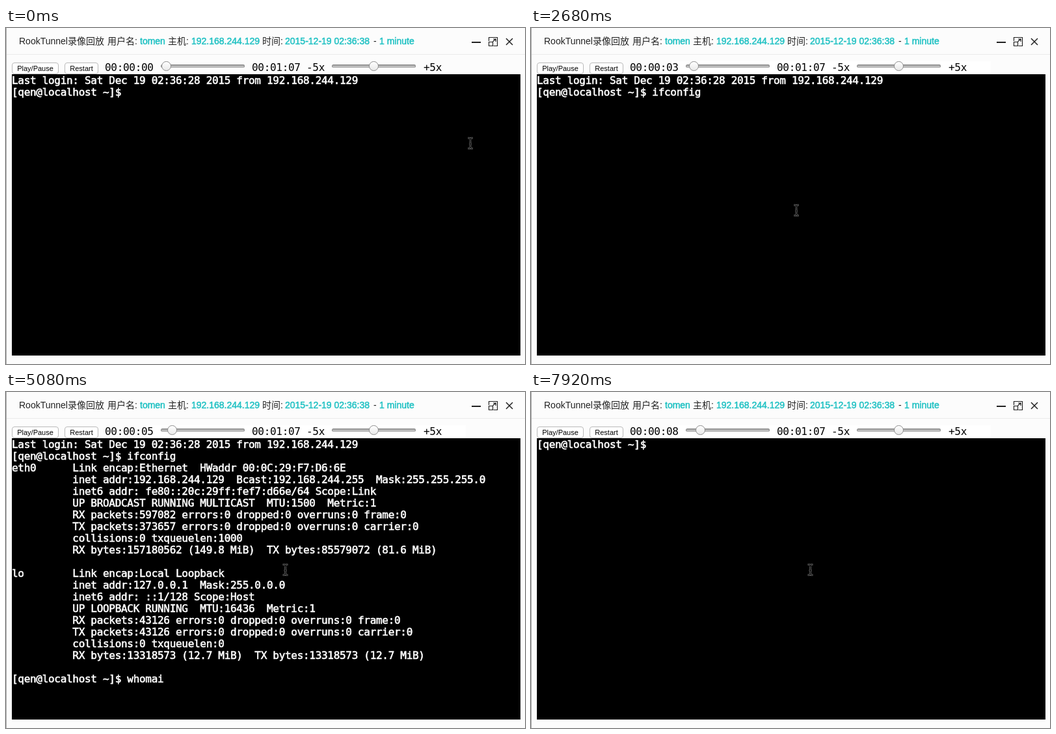
Recreate the animation shown at these times as an HTML page. Size 798 px wide and 516 px high, loop 8 s.

```html
<!DOCTYPE html>
<html lang="zh">
<head>
<meta charset="utf-8">
<title>Session replay</title>
<style>
html, body { margin: 0; width: 100%; height: 100%; overflow: hidden; }
body { position: relative; background: #fcfcfc; color: #000; }
body * { position: absolute; box-sizing: border-box; margin: 0; white-space: pre; }
.edge { left: 0; top: 0; width: 1px; height: 516px; background: #aaa; }
.rule { left: 1px; top: 40px; width: 797px; height: 1px; background: #eaeaea; }
.title span { top: 10px; font: 14px/20px "Liberation Sans", "Noto Sans CJK SC", "Noto Sans CJK", sans-serif; color: #222; }
.title .hl { color: #1fc1c3; -webkit-text-stroke: .5px #1fc1c3; }
svg { left: 0; top: 0; overflow: visible; fill: none; }
.mono { font: 16px/18px "DejaVu Sans Mono", monospace; letter-spacing: -.3px; }
.clock { top: 52px; }
.btn { top: 53px; height: 18px; border: 1px solid #b9b9b9; border-radius: 4px; background: #fff;
  font: 11px/16px "Liberation Sans", sans-serif; text-align: center; }
.track { top: 56px; width: 129px; height: 5px; border: 1px solid #8a8a8a; border-bottom-color: #aaa;
  border-radius: 3px; background: linear-gradient(#9a9a9a, #d0d0d0); }
.thumb { top: 51px; width: 15px; height: 15px; margin-left: -7.5px; border: 1px solid #8c8c8c;
  border-radius: 50%; background: linear-gradient(#fff, #e9e9e9); }
#patch { left: 217px; top: 51px; width: 490px; height: 20px; background: #fff; }
#term { left: 9px; top: 71px; width: 782px; height: 432px; padding-top: 1px; background: #000; color: #fff;
  overflow: hidden; -webkit-text-stroke: .6px #fff; }
</style>
</head>
<body>
<div class="edge"></div>
<div class="rule"></div>
<div class="title">
  <span style="left:20px">RookTunnel录像回放</span>
  <span style="left:156px">用户名:</span><span class="hl" style="left:206px">tomen</span>
  <span style="left:249px">主机:</span><span class="hl" style="left:285px">192.168.244.129</span>
  <span style="left:394px">时间:</span><span class="hl" style="left:429px">2015-12-19 02:36:38</span>
  <span style="left:565px">-</span><span class="hl" style="left:574px">1 minute</span>
</div>
<svg width="798" height="41" stroke="#222" stroke-width="1.5">
  <path d="M716 22h14" stroke-width="2"/>
  <path d="M742.5 20v-5.5h13v13h-6M742.5 21.5h6v6h-6zM748.5 21l4.5-4.5M749 17h4v4" stroke-width="1.2"/>
  <path d="M769 16l10 10M779 16l-10 10"/>
</svg>
<div id="patch"></div>
<div class="btn" style="left:9px;width:72px">Play/Pause</div>
<div class="btn" style="left:90px;width:52px">Restart</div>
<span class="mono clock" id="clock" style="left:152px"></span>
<div class="track" style="left:238px"></div>
<div class="thumb" id="thumb"></div>
<span class="mono clock" style="left:378px">00:01:07</span>
<span class="mono clock" style="left:462px">-5x</span>
<div class="track" style="left:501px"></div>
<div class="thumb" style="left:565.5px"></div>
<span class="mono clock" style="left:642px">+5x</span>
<pre class="mono" id="term"></pre>
<svg id="beam" width="1" height="1">
  <defs>
    <path id="bar" d="M-4 -8h2.5l1.5 1.5l1.5 -1.5h2.5M0 -6.5v13M-4 8h2.5l1.5 -1.5l1.5 1.5h2.5M-2 1h4"/>
  </defs>
  <use href="#bar" stroke="#808080" stroke-width="2.6"/>
  <use href="#bar" stroke="#000" stroke-width="1.2"/>
</svg>
<script>
const LOOP = 8000;
const TICK = 149.4;
const $ = id => document.getElementById(id);
const clamp = (v, lo, hi) => Math.min(hi, Math.max(lo, v));
const mix = (a, b, p) => a + (b - a) * p;

const prompt = '[qen@localhost ~]$ ';
const login = 'Last login: Sat Dec 19 02:36:28 2015 from 192.168.244.129\n';

const iface = (name, lines) =>
  lines.map((line, i) => (i ? '' : name).padEnd(10) + line).join('\n') + '\n\n';
const report = iface('eth0', [
  'Link encap:Ethernet  HWaddr 00:0C:29:F7:D6:6E',
  'inet addr:192.168.244.129  Bcast:192.168.244.255  Mask:255.255.255.0',
  'inet6 addr: fe80::20c:29ff:fef7:d66e/64 Scope:Link',
  'UP BROADCAST RUNNING MULTICAST  MTU:1500  Metric:1',
  'RX packets:597082 errors:0 dropped:0 overruns:0 frame:0',
  'TX packets:373657 errors:0 dropped:0 overruns:0 carrier:0',
  'collisions:0 txqueuelen:1000',
  'RX bytes:157180562 (149.8 MiB)  TX bytes:85579072 (81.6 MiB)'
]) + iface('lo', [
  'Link encap:Local Loopback',
  'inet addr:127.0.0.1  Mask:255.0.0.0',
  'inet6 addr: ::1/128 Scope:Host',
  'UP LOOPBACK RUNNING  MTU:16436  Metric:1',
  'RX packets:43126 errors:0 dropped:0 overruns:0 frame:0',
  'TX packets:43126 errors:0 dropped:0 overruns:0 carrier:0',
  'collisions:0 txqueuelen:0',
  'RX bytes:13318573 (12.7 MiB)  TX bytes:13318573 (12.7 MiB)'
]);

// Number of keys pressed by tick n, at a steady rate from the given tick.
const presses = (n, from, rate = 1) => n < from ? 0 : Math.floor((n - from) * rate) + 1;
const typed = (text, n, from, rate) => text.slice(0, presses(n, from, rate));

const firstCommand = n => typed('ifc', n, 9) + typed('onfig', n, 14);

function secondCommand(n) {
  const typo = typed('whoma', n, 22, 2) + typed('i', n, 26);
  const erased = clamp(presses(n, 35, 1 / 3), 0, 3);
  return typo.slice(0, typo.length - erased) + typed('ami', n, 42);
}

function screen(n) {
  if (n >= 53) return prompt;
  let text = login + prompt + firstCommand(n);
  if (n >= 19) text += '\n' + report + prompt + secondCommand(n);
  if (n >= 46) text += '\nqen\n' + prompt;
  return text;
}

// The pointer sweeps in, settles, then is nudged aside when the output appears.
function pointer(n) {
  if (n >= 19) return [429.5, 273];
  const p = clamp(n / 4, 0, 1);
  const sweep = p * p * (3 - 2 * p);
  const settle = clamp((n - 4) / 2, 0, 1);
  return [mix(714, 410, sweep) - 2 * settle, mix(177, 276, sweep) + 4 * settle];
}

function put(el, text) {
  if (el.textContent !== text) el.textContent = text;
}

function draw(now) {
  const n = Math.floor((now % LOOP + 12) / TICK);
  const [x, y] = pointer(n);
  put($('term'), screen(n));
  put($('clock'), '00:00:0' + Math.floor((n + 2.95) / 6.7));
  $('thumb').style.left = 246.5 + Math.floor(n * .27) + 'px';
  $('beam').style.transform = `translate(${x}px, ${y}px)`;
  $('patch').style.visibility = n ? 'visible' : 'hidden';
}

const start = performance.now();
function loop() {
  draw(performance.now() - start);
  requestAnimationFrame(loop);
}
loop();
</script>
</body>
</html>
```
